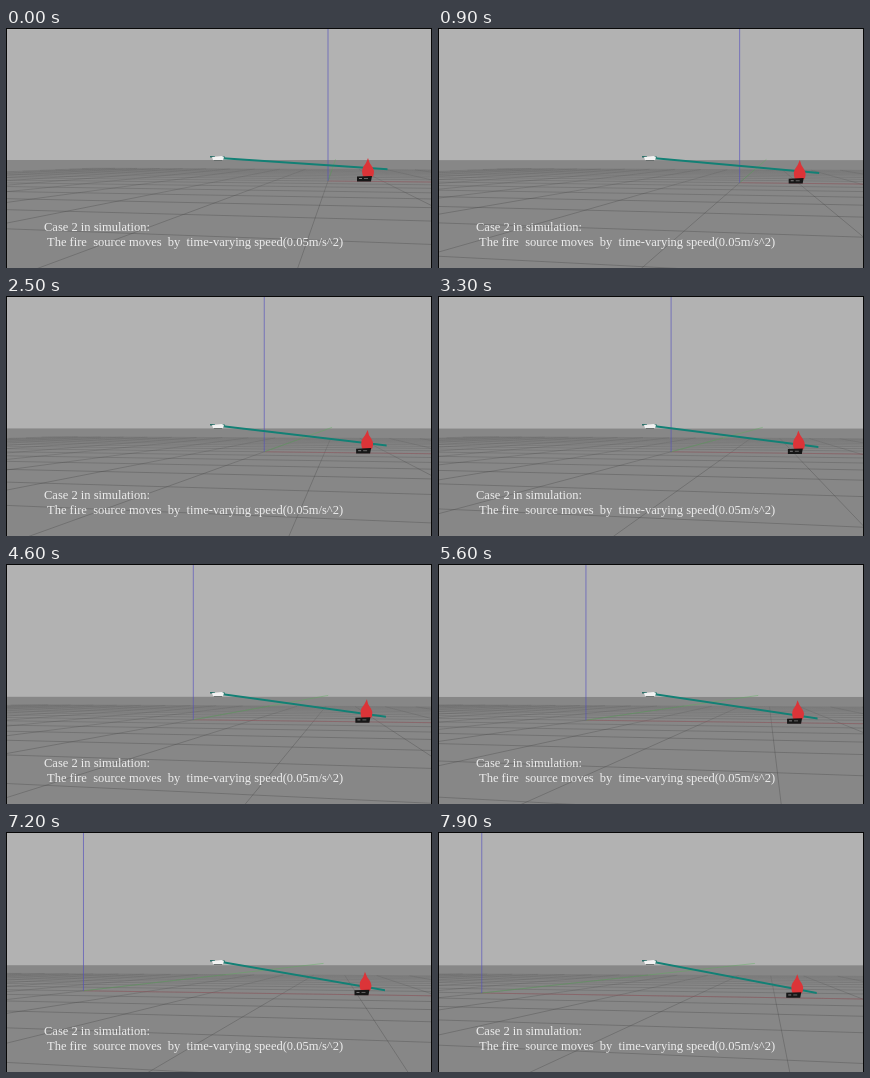
Write an HTML page with a canvas that moves like this. It is 426 by 240 pixels and loops after 8000 ms.

```html
<!DOCTYPE html>
<html lang="en">
<head>
<meta charset="utf-8">
<title>Fire tracking simulation</title>
<style>
  html, body { margin: 0; width: 100%; height: 100%; overflow: hidden; background: #b2b2b2; }
  canvas, svg { position: absolute; left: 0; top: 0; width: 426px; height: 240px; }
  text { font: 12.5px "Liberation Serif", "Times New Roman", serif; fill: #ececec; white-space: pre; }
</style>
</head>
<body>
<canvas id="stage" width="426" height="240"></canvas>
<svg viewBox="0 0 426 240">
  <text x="38" y="203">Case 2 in simulation:</text>
  <text x="41" y="217.5">The fire  source moves  by  time-varying speed(0.05m/s^2)</text>
</svg>
<script>
const ctx = document.getElementById('stage').getContext('2d');
const WIDTH = 426, HEIGHT = 240, LOOP = 8000, STEP = 100;

// Camera: focal length, focal length times height, vanishing point, heading
const FOCAL = 500, DROP = 218, EYE_X = 213, EYE_Y = 130, NEAR = 0.6;
const YAW = Math.atan(117 / FOCAL), COS = Math.cos(YAW), SIN = Math.sin(YAW);

// Floor lines fade towards the horizon
const gridInk = ctx.createLinearGradient(0, 140, 0, 175);
gridInk.addColorStop(0, 'rgba(64,64,64,.16)');
gridInk.addColorStop(1, 'rgba(64,64,64,.4)');

// The axes drift left under constant acceleration while the camera bobs
function poseAt(t) {
  const originY = 153 + 2.5 * t - 0.725 * t ** 2 + 0.068 * t ** 3;
  const cartY = originY - 4.8 + 0.55 * t;
  return {
    origin: { x: 322 - 21 * t - 1.8 * t ** 2, y: originY },
    cart: { x: 351 - 0.35 * t, y: cartY },
    beam: { x: 381.5 - 0.35 * t, y: cartY - 7 + 2 * t - 0.135 * t ** 2 },
    horizon: 132 + 0.17 * t
  };
}

function line(x1, y1, x2, y2, color, width = 1) {
  ctx.strokeStyle = color;
  ctx.lineWidth = width;
  ctx.beginPath();
  ctx.moveTo(x1, y1);
  ctx.lineTo(x2, y2);
  ctx.stroke();
}

function box(x, y, w, h, color) {
  ctx.fillStyle = color;
  ctx.fillRect(x, y, w, h);
}

function shape(points, color) {
  ctx.fillStyle = color;
  ctx.beginPath();
  points.forEach(([x, y]) => ctx.lineTo(x, y));
  ctx.fill();
}

// Draws a line on the floor, cut off in front of the camera
function floorLine(from, to, origin, color) {
  const depth = DROP / (origin.y - EYE_Y);
  const side = (origin.x - EYE_X) * depth / FOCAL;
  const view = ([u, v]) => [side + u * COS + v * SIN, depth - u * SIN + v * COS];
  let a = view(from), b = view(to);
  if (a[1] > b[1]) [a, b] = [b, a];
  if (b[1] <= NEAR) return;
  if (a[1] < NEAR) {
    const k = (NEAR - a[1]) / (b[1] - a[1]);
    a = [a[0] + (b[0] - a[0]) * k, NEAR];
  }
  const screen = ([x, z]) => [EYE_X + FOCAL * x / z, EYE_Y + DROP / z];
  line(...screen(a), ...screen(b), color, 0.8);
}

function drawFloor(origin) {
  for (let n = -10; n <= 10; n++) {
    floorLine([-10, n], [10, n], origin, gridInk);
    floorLine([n, -10], [n, 10], origin, gridInk);
  }
  floorLine([0, 0], [18, 0], origin, 'rgba(165,80,90,.5)');
  floorLine([0, 0], [0, 150], origin, 'rgba(90,175,90,.55)');
}

function drawRobot() {
  box(204, 128, 5, 1.5, '#2d6f68');
  box(215, 128.5, 4, 2.5, '#2d7f75');
  shape([[206, 129], [216, 128], [218, 129.5], [217, 132], [207, 132]], '#f2f2f2');
  box(208, 132, 8, 0.8, '#5e6664');
}

function drawFire({ x, y }, t) {
  const cx = x + 11, top = y - 18.3, shoulder = y - 9;
  const tip = cx + Math.sin(t * 3.2) * 0.6;
  ctx.fillStyle = '#dc3438';
  ctx.beginPath();
  ctx.moveTo(tip, top);
  ctx.quadraticCurveTo(cx + 1, top + 5, cx + 4.5, shoulder);
  ctx.quadraticCurveTo(cx + 7.5, y - 4, cx + 4.5, y + 0.8);
  ctx.lineTo(cx - 4.5, y + 0.8);
  ctx.quadraticCurveTo(cx - 7, y - 4, cx - 5, shoulder);
  ctx.quadraticCurveTo(cx - 1.5, top + 5, tip, top);
  ctx.fill();
  shape([[x, y + 0.3], [x + 15, y - 0.3], [x + 14, y + 5.2], [x, y + 5.2]], '#161616');
  box(x + 2, y + 2, 3, 0.8, '#999');
  box(x + 7, y + 2, 4, 0.8, '#777');
}

function drawEdges() {
  box(0, 0, 1, HEIGHT, '#080808');
  box(WIDTH - 1, 0, 1, HEIGHT, '#080808');
  box(0, 0, WIDTH, 1, '#080808');
}

function draw(time) {
  const t = time / 1000;
  const { origin, cart, beam, horizon } = poseAt(t);
  box(0, 0, WIDTH, HEIGHT, '#b2b2b2');
  box(0, horizon, WIDTH, HEIGHT - horizon, '#878787');
  drawFloor(origin);
  line(origin.x, 0, origin.x, origin.y, 'rgba(85,80,190,.65)');
  shape([[217, 129.3], [beam.x, beam.y - 1], [beam.x, beam.y + 1], [217, 131.2]], '#128075');
  drawRobot();
  drawFire(cart, t);
  drawEdges();
}

const start = performance.now();
function tick(now) {
  const time = Math.max(0, now - start) % LOOP;
  draw(Math.floor(time / STEP) * STEP);
  requestAnimationFrame(tick);
}
draw(0);
requestAnimationFrame(tick);
</script>
</body>
</html>
```
